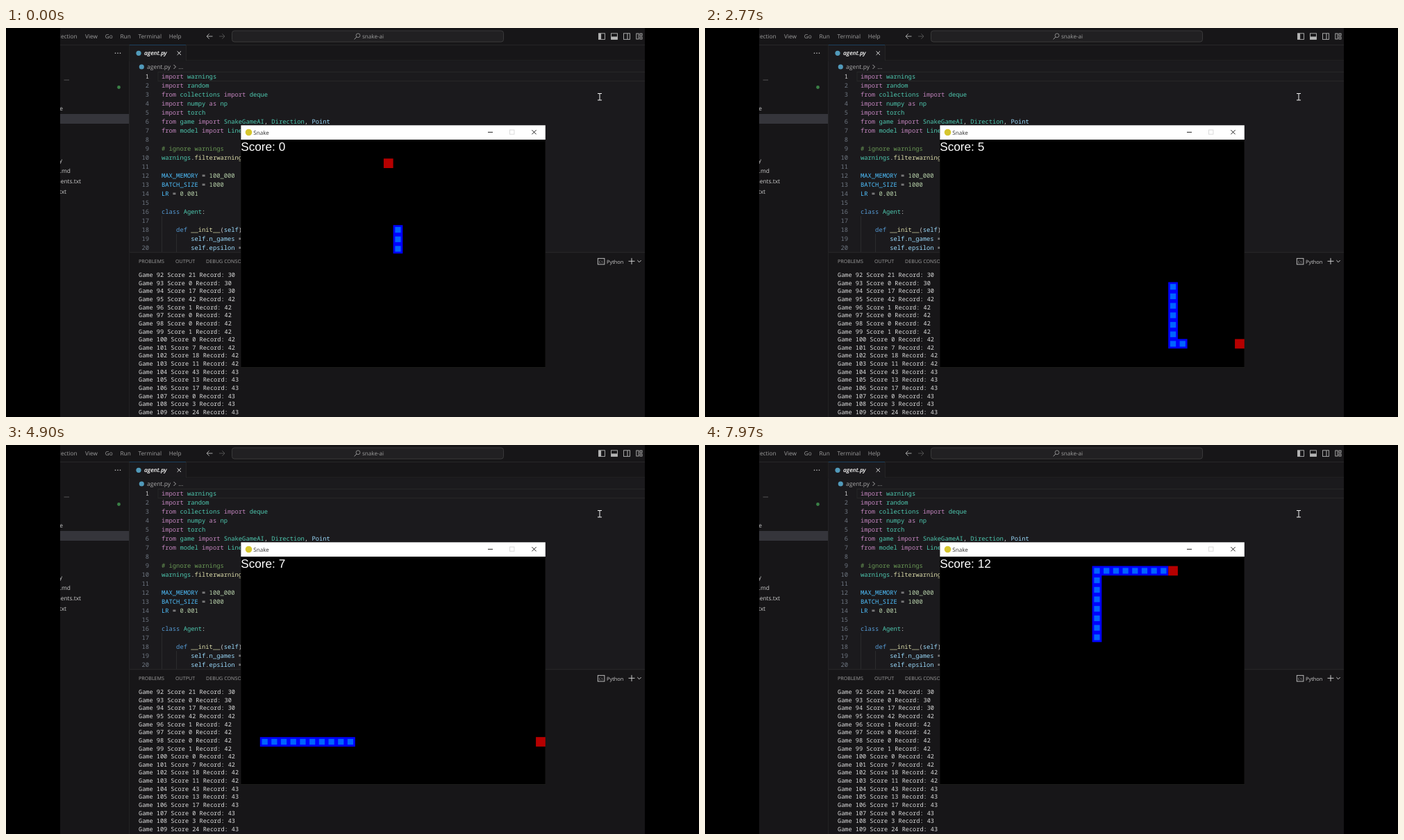
An HTML page with a canvas for the animation above (8 s loop, 998 by 561 pixels).

```html
<!DOCTYPE html>
<html lang="en">
<head>
<meta charset="utf-8">
<title>Snake AI</title>
<style>
html, body { margin: 0; width: 100%; height: 100%; overflow: hidden; background: #000; }
canvas { display: block; }
</style>
</head>
<body>
<canvas id="stage" width="998" height="561"></canvas>
<script>
const W = 998, H = 561, LOOP = 8000;
const UI = '"Open Sans", "Noto Sans", sans-serif';
const MONO = '"Noto Sans Mono", "DejaVu Sans Mono", monospace';
const SIDE = '#171618', EDITOR = '#1b1a1d', LINE = '#2a2a2b';
const DIM = '#9d9d9d', LIGHT = '#cccccc', ICON = '#b4b4b4';
const stage = document.getElementById('stage').getContext('2d');
const backdrop = document.createElement('canvas');
backdrop.width = W;
backdrop.height = H;
const bg = backdrop.getContext('2d');

function rect(c, x, y, w, h, color) {
  c.fillStyle = color;
  c.fillRect(x, y, w, h);
}

// Draws a string and returns its width
function text(c, str, x, y, font, color, align = 'left') {
  c.textRendering = 'geometricPrecision';
  c.font = font;
  c.fillStyle = color;
  c.textAlign = align;
  c.fillText(str, x, y);
  return c.measureText(str).width;
}

function textRow(c, words, x, y, gap, font, color) {
  for (const word of words) x += text(c, word, x, y, font, color) + gap;
}

function line(c, color, x0, y0, x1, y1, width = 1) {
  c.strokeStyle = color;
  c.lineWidth = width;
  c.beginPath();
  c.moveTo(x0, y0);
  c.lineTo(x1, y1);
  c.stroke();
}

// Open arrowhead with its tip at x, y, pointing along dx, dy
function chevron(c, x, y, dx, dy, size, color) {
  const bx = x - dx * size, by = y - dy * size;
  line(c, color, bx - dy * size, by - dx * size, x, y);
  line(c, color, bx + dy * size, by + dx * size, x, y);
}

function box(c, x, y, w, h, color, width = 0.9) {
  c.strokeStyle = color;
  c.lineWidth = width;
  c.strokeRect(x, y, w, h);
}

function dot(c, x, y, r, color) {
  c.fillStyle = color;
  c.beginPath();
  c.arc(x, y, r, 0, Math.PI * 2);
  c.fill();
}

function cross(c, x, y, r, color) {
  line(c, color, x - r, y - r, x + r, y + r);
  line(c, color, x - r, y + r, x + r, y - r);
}

// Syntax colours, picked by the letter in front of each "~" separated token
const INK = {
  k: '#c586c0', t: '#4ec9b0', w: '#d4d4d4', c: '#6a9955', y: '#dcdcaa',
  C: '#4fc1ff', n: '#b5cea8', b: '#569cd6', v: '#9cdcfe'
};
const CODE = [
  'kimport ~twarnings',
  'kimport ~trandom',
  'kfrom ~tcollections ~kimport ~tdeque',
  'kimport ~tnumpy ~kas ~tnp',
  'kimport ~ttorch',
  'kfrom ~tgame ~kimport ~tSnakeGameAI~w, ~tDirection~w, ~vPoint',
  'kfrom ~tmodel ~kimport ~tLinear',
  '',
  'c# ignore warnings',
  'twarnings~w.~yfilterwarnings',
  '',
  'CMAX_MEMORY ~w= ~n100_000',
  'CBATCH_SIZE ~w= ~n1000',
  'CLR ~w= ~n0.001',
  '',
  'bclass ~tAgent~w:',
  '',
  'w    ~bdef ~y__init__~w(~vself~w):',
  'w        ~vself~w.~vn_games ~w= ',
  'w        ~vself~w.~vepsilon ~w= '
];
const SCORES = '21 0 17 42 1 0 0 1 0 7 18 11 43 13 17 0 3 24'.split(' ').map(Number);

function drawTitleBar(c) {
  const font = '8.25px ' + UI;
  rect(c, 78, 0, 842, 24, SIDE);
  rect(c, 78, 24, 842, 0.7, LINE);
  text(c, 'Selection', 102.5, 15, font, DIM, 'right');
  textRow(c, ['View', 'Go', 'Run', 'Terminal', 'Help'], 114, 15, 10.8, font, DIM);
  line(c, '#a8a8a8', 289, 12, 297.5, 12);
  chevron(c, 289, 12, -1, 0, 3.7, '#a8a8a8');
  line(c, '#505050', 307, 12, 315, 12);
  chevron(c, 315, 12, 1, 0, 3.7, '#505050');

  c.beginPath();
  c.roundRect(325.5, 4, 391, 16, 3.5);
  c.fillStyle = '#212022';
  c.fill();
  c.strokeStyle = '#404040';
  c.lineWidth = 0.8;
  c.stroke();
  c.strokeStyle = DIM;
  c.beginPath();
  c.arc(507, 10.8, 2.9, 0, Math.PI * 2);
  c.stroke();
  line(c, DIM, 504.8, 13, 501.6, 16.4);
  text(c, 'snake-ai', 513, 15, '8.1px ' + UI, DIM);

  for (let i = 0; i < 3; i++) box(c, 853.5 + 18 * i, 7.8, 9, 8.6, ICON);
  rect(c, 853.5, 7.8, 3.6, 8.6, ICON);
  rect(c, 871.5, 12.4, 9, 4, ICON);
  line(c, ICON, 895, 8, 895, 16);
  box(c, 907.8, 8, 3.3, 8, ICON);
  for (const y of [8, 13]) box(c, 913, y, 3, 3, ICON);
}

function drawSidebar(c) {
  const rowY = i => 74 + 15 * i;
  const file = (name, right, row, color = LIGHT) =>
    text(c, name, right, rowY(row), '8.4px ' + UI, color, 'right');
  rect(c, 78, 24.7, 99, H, SIDE);
  rect(c, 78, 124, 99, 14, '#35353b');
  rect(c, 177, 24, 0.8, H, LINE);
  for (let i = -1; i < 2; i++) dot(c, 161 + 3.5 * i, 36.3, 0.8, LIGHT);
  dot(c, 162.5, 85.5, 2.4, '#3a8046');
  file('__', 91, 0, '#8c8c8c');
  file('e', 82, 3);
  file('model.py', 81, 8);
  file('README.md', 93, 9);
  file('requirements.txt', 108, 10);
  file('.txt', 87, 11);
}

function drawEditor(c) {
  rect(c, 177.8, 24.7, 742.2, 22.5, SIDE);
  rect(c, 177.8, 46.5, 742.2, 0.7, LINE);
  rect(c, 177.8, 47.2, 742.2, 277, EDITOR);
  rect(c, 177.8, 24.5, 81.2, 23, EDITOR);
  rect(c, 177.8, 24, 81.2, 1, '#0078d4');
  rect(c, 259, 24.7, 0.7, 22.5, LINE);
  dot(c, 191, 36.3, 3.6, '#519aba');
  text(c, 'agent.py', 199, 39.3, 'italic 600 8.4px ' + UI, '#ffffff');
  cross(c, 249.3, 36.2, 2.7, '#e0e0e0');
  dot(c, 195.3, 56, 3.6, '#519aba');
  text(c, 'agent.py', 203, 59, '8.5px ' + UI, '#a9a9a9');
  chevron(c, 244.5, 56, 1, 0, 3, '#a9a9a9');
  text(c, '...', 248.5, 59, '8.5px ' + UI, '#a9a9a9');

  box(c, 219, 63.5, 705, 13, '#272728', 1);
  rect(c, 224, 271, 0.8, 53, '#303032');
  rect(c, 245, 297, 0.8, 27, '#303032');

  const font = '500 8.8px ' + MONO;
  CODE.forEach((code, i) => {
    const y = 72.8 + 13 * i;
    text(c, i + 1, 206, y, font, i ? '#6e7681' : LIGHT, 'right');
    let x = 224;
    for (const token of code.split('~')) {
      x += text(c, token.slice(1), x, y, font, INK[token[0]] || LIGHT);
    }
  });
}

function drawPanel(c) {
  rect(c, 177.8, 323.5, 742.2, H, SIDE);
  rect(c, 177.8, 323.2, 742.2, 0.9, LINE);
  textRow(c, ['PROBLEMS', 'OUTPUT', 'DEBUG CONSOLE'], 191, 339.2, 16, '7.15px ' + UI, DIM);
  box(c, 852.3, 332.3, 9.6, 8.6, LIGHT);
  text(c, 'C:\\', 853.8, 338.6, '4.6px ' + UI, LIGHT);
  text(c, 'Python', 865, 339.5, '7.4px ' + UI, LIGHT);
  line(c, LIGHT, 896.5, 336.3, 905.5, 336.3);
  line(c, LIGHT, 901, 331.8, 901, 340.8);
  chevron(c, 912, 337.7, 0, 1, 2.7, LIGHT);

  let record = 30;
  SCORES.forEach((score, i) => {
    record = Math.max(record, score);
    const row = `Game ${92 + i} Score ${score} Record: ${record}`;
    text(c, row, 191, 359.1 + 11.63 * i, '500 8.58px ' + MONO, '#dedede');
  });
}

function drawPointer(c) {
  line(c, '#f0f0f0', 855, 95, 855, 104);
  for (const y of [94.5, 104]) line(c, '#f0f0f0', 852, y, 858, y);
}

function drawWindow(c) {
  rect(c, 338, 140, 439, 350, '#1c1c1a');
  rect(c, 338.4, 140.3, 438.4, 20.7, '#ffffff');
  rect(c, 338.4, 161, 438.2, 328, '#000000');
  dot(c, 349.5, 150.5, 4.8, '#d6c62e');
  text(c, 'Snake', 356.3, 153.5, '8.1px ' + UI, '#303030');
  line(c, '#202020', 694, 150.3, 701, 150.3);
  box(c, 725.5, 147, 6.4, 6.2, '#d8d8d8');
  cross(c, 760.5, 150.2, 3.1, '#202020');
}

function drawBackdrop(c) {
  [drawSidebar, drawEditor, drawPanel, drawTitleBar, drawPointer, drawWindow].forEach(f => f(c));
  rect(c, 0, 0, 78, H, '#000');
  rect(c, 920, 0, 78, H, '#000');
}

// The snake's route from its tail at 16, 11: direction, cells, "*" where an apple lies
const ROUTE = 'U9 L1* L13 D12* D5 R19* U6 L4* U12 R7* D20 R7* U19 L30* D17 R30* ' +
  'U13 L31* D13 R6* R10* U7* U11 R8*';
const CELL = 13.7, LEFT = 338.4, TOP = 160.9;
const FPS = 30, STEPS_PER_FRAME = 1.281, PHASE = 0.93;

const cells = [{ x: 16, y: 11, score: 0 }];
const apples = [];
for (const [, dir, count, apple] of ROUTE.matchAll(/([ULDR])(\d+)(\*?)/g)) {
  const dx = (dir === 'R') - (dir === 'L'), dy = (dir === 'D') - (dir === 'U');
  for (let i = 0; i < count; i++) {
    const { x, y } = cells[cells.length - 1];
    cells.push({ x: x + dx, y: y + dy, score: apples.length });
  }
  if (apple) {
    const end = cells[cells.length - 1];
    apples.push(end);
    end.score = apples.length;
  }
}

function block({ x, y }, color, inset = 0) {
  const size = CELL - 2 * inset;
  rect(stage, LEFT + x * CELL + inset, TOP + y * CELL + inset, size, size, color);
}

function draw(ms) {
  // The 5 ms allow for frame times rounded to hundredths of a second
  const frame = Math.floor((ms + 5) * FPS / 1000) % (LOOP * FPS / 1000);
  const head = Math.floor(frame * STEPS_PER_FRAME + PHASE) + 2;
  const { score } = cells[head];
  const body = cells.slice(head - score - 2, head + 1);

  stage.drawImage(backdrop, 0, 0);
  // One fill for the whole body, so no seams show between blocks
  stage.fillStyle = '#0000ff';
  stage.beginPath();
  body.forEach((p, i) => {
    const q = body[Math.max(0, i - 1)];
    stage.rect(LEFT + Math.min(p.x, q.x) * CELL, TOP + Math.min(p.y, q.y) * CELL,
      CELL * (1 + Math.abs(p.x - q.x)), CELL * (1 + Math.abs(p.y - q.y)));
  });
  stage.fill();
  for (const p of body) block(p, '#0064ff', CELL * 0.2);
  block(apples[score], '#b60000');
  text(stage, 'Score: ' + score, 338.2, 176.7, '17.2px "Liberation Sans", Arial, sans-serif', '#ffffff');
}

drawBackdrop(bg);
const start = performance.now();
function tick() {
  draw((performance.now() - start) % LOOP);
  requestAnimationFrame(tick);
}
tick();
</script>
</body>
</html>
```
